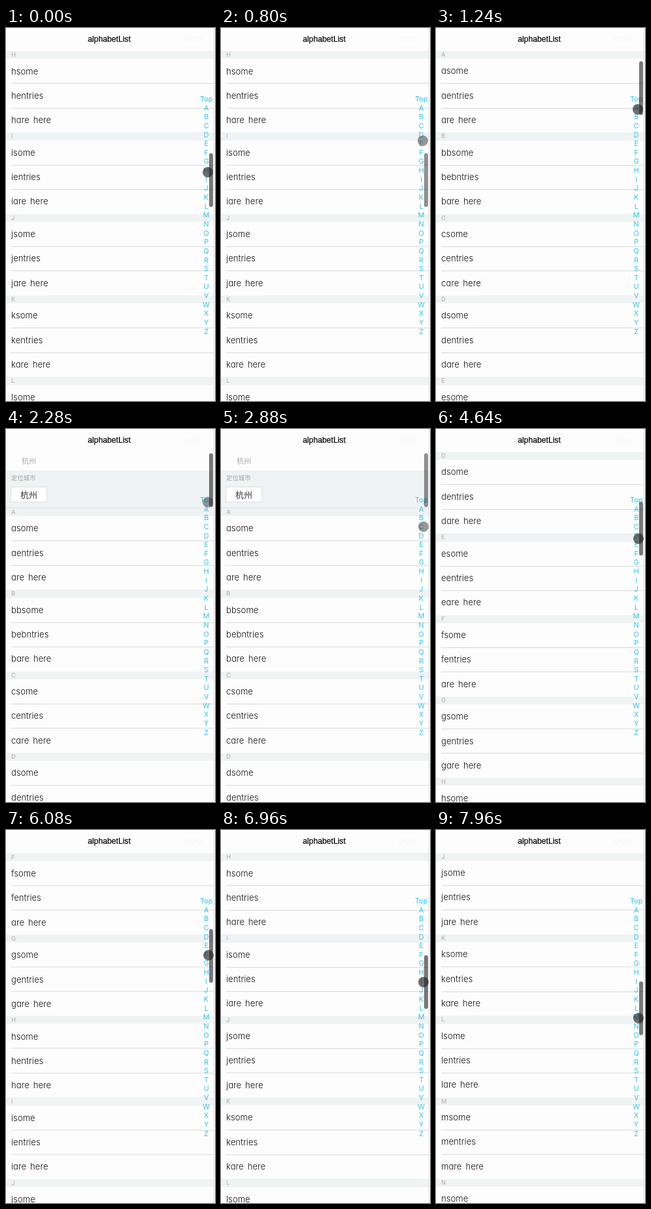
Write an HTML page that moves like this. It is 320 px wide and 569 px high and loops after 8000 ms.

```html
<!DOCTYPE html>
<html lang="en">
<head>
<meta charset="utf-8">
<title>alphabetList</title>
<style>
  html, body { margin: 0; width: 100%; height: 100%; overflow: hidden; background: #fdfdfd; }
  body { position: relative; font-family: Inter, "Noto Sans", sans-serif; font-feature-settings: "cv11"; }
  #stage { position: absolute; left: 0; top: 0; width: 320px; height: 569px; overflow: hidden; background: #fdfdfd; }
  #stage div { position: absolute; box-sizing: border-box; white-space: nowrap; }
  #bar { left: 0; top: 0; width: 320px; height: 35px; background: #fdfdfd; }
  #title { left: 0; width: 316px; top: 7px; line-height: 20px; text-align: center; color: #000;
    font-family: "Liberation Sans", Arial, sans-serif; font-size: 12.2px; -webkit-text-stroke: .2px #000; }
  .dot { top: 13px; width: 8px; height: 8px; border: 1px solid #f6f6f6; border-radius: 50%; }
  #view { left: 0; top: 35px; width: 320px; height: 534px; overflow: hidden; }
  #list { left: 0; top: 0; width: 320px; }
  .head { left: 0; width: 318px; height: 12.4px; line-height: 12.4px; padding-left: 8px;
    background: #f0f3f4; color: #aaa; font-size: 9.5px; }
  .item { left: 8px; width: 310px; height: 37.3px; line-height: 37px;
    color: #111; font-size: 13px; font-weight: 300; letter-spacing: .08px; word-spacing: 2.2px; }
  .line { left: 8px; width: 310px; height: 1px; background: #d8d9da; }
  .cjk { font-family: "Noto Sans CJK SC", "Noto Sans CJK", "Noto Sans CJK JP", sans-serif; }
  #near { left: 24px; top: 3px; line-height: 20px; font-size: 11px; color: #aaa; }
  #panel { left: 0; top: 28px; width: 318px; height: 58px; background: #f0f3f4; border-bottom: 1px solid #dfe2e3; }
  #label { left: 8px; top: 2px; line-height: 18px; font-size: 9.4px; font-weight: 500; color: #a0a2a3; }
  #city { left: 7px; top: 25px; width: 56px; height: 24px; line-height: 22px; text-align: center;
    font-size: 13px; color: #333; background: #fff; border: 1px solid #dcdfe0; }
  .key { left: 286.7px; width: 40px; height: 14px; line-height: 14px; text-align: center;
    font-size: 10.8px; color: #35c0e8; }
  #edge { left: 318px; top: 0; width: 1px; height: 569px; background: #dedede; }
  #thumb { left: 310.5px; top: 36.6px; width: 6px; height: 82.6px; border-radius: 3px; background: #000; }
  #touch { left: -8.3px; top: -8.3px; width: 16.6px; height: 16.6px; border-radius: 50%; }
</style>
</head>
<body>
<div id="stage">
  <div id="view"><div id="list">
    <div id="near" class="cjk">杭州</div>
    <div id="panel" class="cjk">
      <div id="label">定位城市</div>
      <div id="city">杭州</div>
    </div>
  </div></div>
  <div id="bar">
    <div id="title">alphabetList</div>
    <div class="dot" style="left:272px"></div>
    <div class="dot" style="left:282px"></div>
    <div class="dot" style="left:292px"></div>
  </div>
  <div id="edge"></div>
  <div id="index"></div>
  <div id="thumb"></div>
  <div id="touch"></div>
</div>
<script>
const LOOP = 8000, STEP = 40;
const INTRO = 86, HEAD = 12.4, ROW = 37.3, SECTION = HEAD + 3 * ROW;
const THUMB_TOP = 36.6, THUMB_SIZE = 82.6, THUMB_RATE = .161;
const KEYS = "ABCDEFGHIJKLMNOPQRSTUVWXYZ";
const $ = id => document.getElementById(id);

function add(parent, cls, top, text = "") {
  const el = document.createElement("div");
  el.className = cls;
  el.style.top = top + "px";
  el.textContent = text;
  parent.append(el);
}

const special = {
  A: ["asome", "aentries", "are here"],
  B: ["bbsome", "bebntries", "bare here"],
  F: ["fsome", "fentries", "are here"]
};

[...KEYS].forEach((key, k) => {
  const top = INTRO + k * SECTION;
  const rows = special[key] || ["some", "entries", "are here"].map(s => key.toLowerCase() + s);
  add($("list"), "head", top, key);
  rows.forEach((text, i) => {
    const y = top + HEAD + i * ROW;
    add($("list"), "item", y, text);
    if (i) add($("list"), "line", y - .35);
  });
});
["Top", ...KEYS].forEach((key, i) => add($("index"), "key", 102 + 13.64 * i, key));

// [time, section shown at the top]
const jumps = [[0, "H"], [1240, "A"], [1440, "Top"], [3280, "C"], [4640, "D"], [5560, "F"], [6960, "H"], [7720, "J"]];
// [time, pressed]
const presses = [[0, 1], [480, 0], [1120, 1], [1280, 0], [1360, 1], [1480, 0], [3160, 1], [3280, 0], [4520, 1]];
// [time, x, y], straight between entries
const path = [
  [0, 309, 220], [480, 309, 220], [1120, 309, 124], [1280, 309, 124], [1440, 309, 109],
  [2240, 309, 109], [2880, 310, 149], [3760, 310, 149], [4200, 310, 167.3], [4640, 310, 167.3],
  [5200, 310, 188], [6040, 310, 188], [6520, 310, 225], [6800, 310, 225], [6960, 310, 232],
  [7280, 310, 252], [7560, 310, 252], [7960, 310, 287], [LOOP, 310, 287]
];

const held = (table, t) => table.filter(row => row[0] <= t).pop()[1];

function along(t) {
  const i = path.findIndex(p => p[0] > t);
  const a = path[i - 1], b = path[i];
  const u = (t - a[0]) / (b[0] - a[0]);
  return [1, 2].map(n => a[n] + (b[n] - a[n]) * u);
}

function draw() {
  const t = Math.floor(performance.now() % LOOP / STEP) * STEP;
  const key = held(jumps, t);
  const scroll = key === "Top" ? 0 : INTRO + KEYS.indexOf(key) * SECTION;
  const [x, y] = along(t);
  const slide = scroll * THUMB_RATE;
  const hover = Math.abs(y - THUMB_TOP - slide - THUMB_SIZE / 2) < THUMB_SIZE / 2 + 6;
  $("list").style.transform = `translateY(${-scroll}px)`;
  $("thumb").style.transform = `translateY(${slide}px)`;
  $("thumb").style.opacity = hover ? .53 : .43;
  $("touch").style.transform = `translate(${x}px, ${y}px)`;
  $("touch").style.background = held(presses, t) ? "rgba(30,30,30,.64)" : "rgba(60,60,60,.52)";
  requestAnimationFrame(draw);
}
draw();
</script>
</body>
</html>
```
